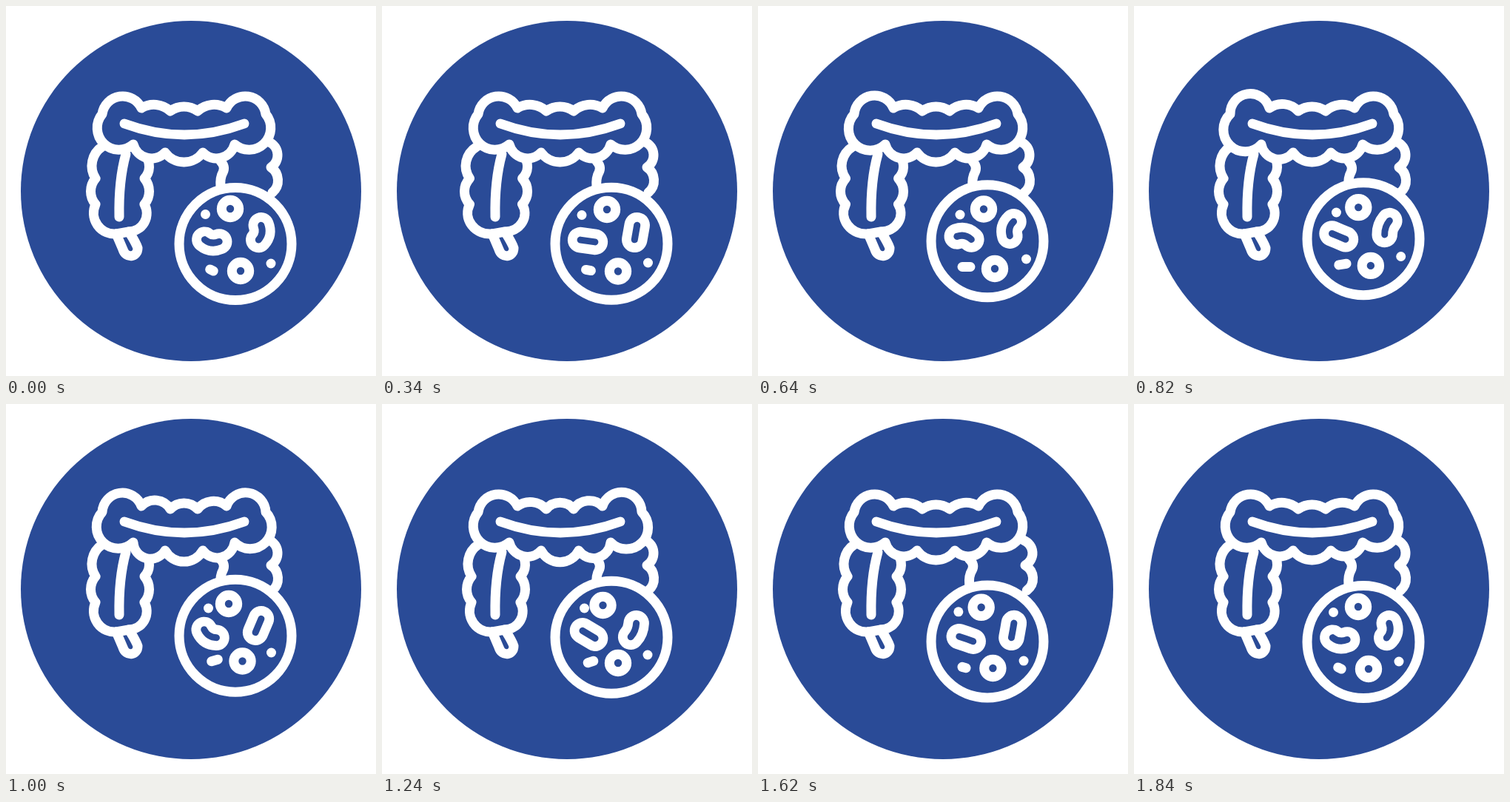
Write an HTML page with a canvas that moves like this. It is 500 px wide and 500 px high and loops after 2000 ms.

```html
<!DOCTYPE html>
<html lang="en">
<head>
<meta charset="utf-8">
<title>Gut flora icon</title>
<style>
  html, body { margin: 0; width: 100%; height: 100%; overflow: hidden; background: #fff; }
  canvas { display: block; width: 500px; height: 500px; }
</style>
</head>
<body>
<canvas id="stage" width="500" height="500"></canvas>
<script>
const ctx = document.getElementById('stage').getContext('2d');
const BLUE = '#2a4b97', WHITE = '#fff', LINE = 13, LOOP = 2000;

// Key times of the drifting microbes; the last pose equals the first.
const KEYS = [180, 340, 640, 1000, 1240, 1440, 1840];
const rings = [
  { x: [303, 304, 305, 301, 298.5, 300], y: [274, 275, 274.5, 270, 272, 275] },
  { x: [317, 319, 320, 319.5, 319, 318], y: [358, 358.5, 355, 347.5, 350, 355] }
];
const dots = [
  { x: [269.5, 270, 273, 273.5, 273.5, 272.5], y: [281.5, 282.5, 282, 276, 276, 279.5] },
  { x: [358, 359.5, 362.5, 358.5, 359, 360], y: [348, 347, 342, 336, 339, 345] }
];
const pills = [
  { x: [278, 278, 279, 275, 279.5, 284], y: [319, 317.5, 311.5, 312, 311.5, 315],
    turn: [8, 8, 12, 33, 31, 31], bend: [2, 0, -2, 2, 0, -2] },
  { x: [345, 343, 341, 341, 341, 343], y: [306.5, 306, 300.5, 299.5, 306, 305.5],
    turn: [100, 100, 105, 113, 112, 102], bend: [-2, 0, 2, 0, -1.2, 1.5] }
];
const dash = { x: [278, 279, 281.5, 282, 282, 279.5], y: [357, 357, 352.5, 346.5, 348.5, 354],
  turn: [25, 10, 0, -17, -17, 0], half: [2.5, 3.5, 5.5, 4.5, 4, 3] };

// Smooth curve through a track's keys, at rest at both ends.
function at(track, t) {
  const v = [...track, track[0]], last = KEYS.length - 1;
  if (t <= KEYS[0] || t >= KEYS[last]) return v[0];
  const i = KEYS.findIndex(k => k > t) - 1;
  const slope = j => j <= 0 || j >= last ? 0 : (v[j + 1] - v[j - 1]) / (KEYS[j + 1] - KEYS[j - 1]);
  const h = KEYS[i + 1] - KEYS[i], u = (t - KEYS[i]) / h, w = 1 - u;
  return v[i] * w * w * (1 + 2 * u) + v[i + 1] * u * u * (3 - 2 * u)
    + h * u * w * (slope(i) * w - slope(i + 1) * u);
}

const pose = (tracks, t) =>
  Object.fromEntries(Object.entries(tracks).map(([key, track]) => [key, at(track, t)]));

function bump(t, mid, reach) {
  const u = (t - mid) / reach;
  return Math.abs(u) < 1 ? Math.cos(u * Math.PI / 2) ** 2 : 0;
}

// Chain of arcs: each entry is an end point and how far the arc bulges out.
function lobes(x, y, arcs, grow = () => 0) {
  let d = `M${x} ${y}`;
  for (const [nx, ny, bulge] of arcs) {
    const chord = Math.hypot(nx - x, ny - y), s = bulge + grow((x + nx) / 2);
    const r = (chord * chord / 4 + s * s) / (2 * s);
    d += `A${r} ${r} 0 ${s > chord / 2 ? 1 : 0} 1 ${nx} ${ny}`;
    [x, y] = [nx, ny];
  }
  return d;
}

function draw(d, { fill, widen = 1, mid = 0, width = LINE, color = WHITE } = {}) {
  const path = new Path2D();
  path.addPath(new Path2D(d), new DOMMatrix([widen, 0, 0, 1, mid * (1 - widen), 0]));
  if (fill) { ctx.fillStyle = fill; ctx.fill(path); }
  ctx.strokeStyle = color;
  ctx.lineWidth = width;
  ctx.stroke(path);
}

function disc(x, y, r, fill, stroke) {
  ctx.beginPath();
  ctx.arc(x, y, r, 0, 2 * Math.PI);
  if (fill) { ctx.fillStyle = fill; ctx.fill(); }
  if (stroke) { ctx.strokeStyle = stroke; ctx.lineWidth = LINE; ctx.stroke(); }
}

function placed({ x, y, turn }, paint) {
  ctx.save();
  ctx.translate(x, y);
  ctx.rotate(turn * Math.PI / 180);
  paint();
  ctx.restore();
}

function colon(t) {
  const left = { widen: 1 + 0.13 * bump(t, 490, 340), mid: 154 };
  const right = { widen: 1 + 0.12 * bump(t, 1560, 290), mid: 330 };

  draw('M149 308L158 329C162 342 178 340 178 327Q176 321 168 308');
  draw(lobes(188, 202, [[187, 233, 6], [187, 268, 6.5], [166, 305, 12]]), left);
  draw(lobes(149, 308, [[121, 268, 14], [121, 233, 6.5], [130, 190, 9]]), left);
  draw('M149 308L166 305');
  draw('M162 200Q152 236 153 285');

  draw('M290 210Q297 217 293 225Q289 232 290 244', right);
  draw(lobes(356, 184, [[358, 218, 10], [360, 252, 8.5]]), right);

  // A squeeze runs along the transverse part from left to right.
  const grow = x => 3.5 * bump(t, Math.min(1140, 820 + (x - 150) * 4), 320);
  draw(lobes(130, 146, [
    [183, 138, 20], [222, 142, 6.5], [259, 142, 6], [298, 138, 6.5], [351, 146, 20],
    [309, 187, 27], [266, 198, 13], [215, 198, 13], [172, 187, 13], [130, 146, 27]
  ], grow) + 'Z', { fill: BLUE });
  draw('M160 159Q241 189 322 159');
}

function dish(t) {
  const u = Math.min(1, Math.abs(t - 1010) / 830);
  disc(310, 321.5 - 8.3 * Math.cos(u * Math.PI / 2) ** 3, 76, BLUE, WHITE);

  for (const ring of rings) {
    const p = pose(ring, t);
    disc(p.x, p.y, 11.7, null, WHITE);
  }
  for (const dot of dots) {
    const p = pose(dot, t);
    disc(p.x, p.y, 6.5, WHITE);
  }
  for (const pill of pills) {
    const p = pose(pill, t);
    const spine = `M-10 ${-p.bend}Q0 ${2 * p.bend} 10 ${-p.bend}`;
    placed(p, () => {
      draw(spine, { width: 34.5 });
      draw(spine, { width: 9, color: BLUE });
    });
  }
  const p = pose(dash, t);
  placed(p, () => draw(`M${-p.half} 0H${p.half}`));
}

function frame(now) {
  const t = Math.floor(now % LOOP / 20) * 20;
  ctx.fillStyle = WHITE;
  ctx.fillRect(0, 0, 500, 500);
  ctx.lineCap = ctx.lineJoin = 'round';
  disc(250, 250, 230, BLUE);
  colon(t);
  dish(t);
  requestAnimationFrame(frame);
}
frame(0);
</script>
</body>
</html>
```
